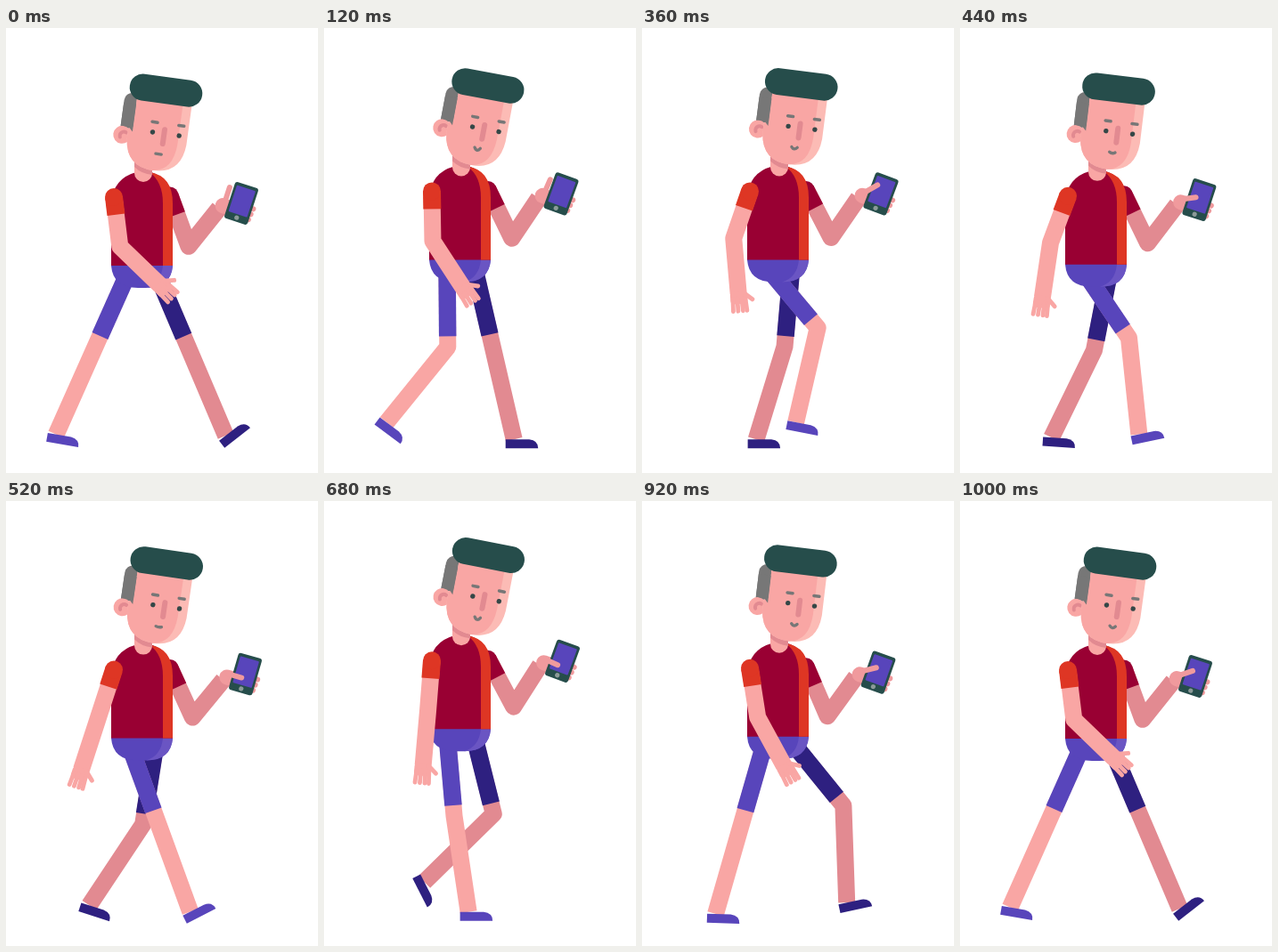
These frames come from a looping animation (350 by 500 pixels, 1.04 s). An HTML page with a canvas:

```html
<!DOCTYPE html>
<html lang="en">
<head>
<meta charset="utf-8">
<title>Walking with a phone</title>
<style>
html, body { margin: 0; width: 100%; height: 100%; overflow: hidden; background: #fff; }
canvas { display: block; }
</style>
</head>
<body>
<canvas id="stage" width="350" height="500"></canvas>
<script>
const ctx = document.getElementById('stage').getContext('2d');
const LOOP = 1040, STEP = 40;
const SKIN = '#f9a6a4', SHADE = '#e28a91', GLOW = '#fcbbb5', HAND = '#f09a9d';
const BLUE = '#5845bb', NAVY = '#2e2080', RED = '#990033', ORANGE = '#de3624';
const TEAL = '#264d4b', GREY = '#777777';

// Rows are [time, values...]; angles in degrees.
const nearLeg = [ // thigh, shin, foot
  [0, -24, -24, 10], [120, .5, -39, 37], [220, 22, -40, 45], [360, 40, -13, 11],
  [440, 34, 6, -12], [520, 20, 20, -27], [580, 14, 15, 0], [680, 5, 8.5, 0],
  [840, -8.5, -8.5, 0], [920, -16, -16, 2], [1000, -24, -24, 10]];
const farLeg = [
  [0, 23, 23, -38], [80, 16, 17, 0], [120, 13, 13, 0], [240, 3, 1, 0],
  [360, -5, -17, 0], [440, -11, -26, 4], [520, -9, -33.5, 18], [600, 0, -42, 42],
  [680, 14, -45.5, 63], [760, 34, -42, 52], [840, 48, -25.5, 26],
  [920, 39, 2, -12], [1000, 23, 23, -38]];
const nearArm = [ // upper, lower
  [0, 7, 46], [120, 1, 33], [360, -19, 5], [520, -18, -18],
  [680, -4.5, -5], [840, 9, 13], [1000, 7, 46]];
const farArm = [ // upper arm, phone x, phone y from waist, phone tilt
  [0, 20, 264, -70, 18], [120, 26, 266, -74, 20], [360, 27.4, 268, -74, 20.5],
  [520, 24.5, 268.5, -72, 16], [680, 28, 267.5, -76.5, 20],
  [840, 26, 266, -74, 20.5], [1000, 20, 264, -70, 18]];
const thumb = [ // tip x, tip y on the phone
  [0, -18, -13], [120, -17, -11], [360, -7, -8], [520, -3, 5],
  [680, -3.6, 6], [840, -3.3, -3], [1000, -4.7, -4.8]];
const smile = [[0, 0], [120, 2.6], [360, 2], [520, .6], [680, 2.6], [840, 2], [1000, 2]];

const rad = deg => deg * Math.PI / 180;
const wave = (t, peak) => Math.cos((t - peak) * Math.PI / 250);
const from = ([x, y], deg, len) => [x + len * Math.sin(rad(deg)), y + len * Math.cos(rad(deg))];

// Smooth curve through the rows
function at(rows, t) {
  let i = 0;
  while (i < rows.length - 2 && t >= rows[i + 1][0]) i++;
  const a = rows[i], b = rows[i + 1];
  const before = rows[i - 1] || a, after = rows[i + 2] || b;
  const span = b[0] - a[0], u = (t - a[0]) / span;
  return a.slice(1).map((v, k) => {
    const w = b[k + 1];
    const m = (w - before[k + 1]) / (b[0] - before[0]) * span;
    const n = (after[k + 1] - v) / (after[0] - a[0]) * span;
    return v + u * (m + u * (3 * (w - v) - 2 * m - n + u * (2 * (v - w) + m + n)));
  });
}

function line(color, width, cap, ...pts) {
  ctx.strokeStyle = color;
  ctx.lineWidth = width;
  ctx.lineCap = cap;
  ctx.lineJoin = 'round';
  ctx.beginPath();
  pts.forEach(p => ctx.lineTo(...p));
  ctx.stroke();
}

function shape(color, path) {
  ctx.fillStyle = color;
  ctx.fill(new Path2D(path));
}

function dot(color, x, y, r) {
  ctx.fillStyle = color;
  ctx.beginPath();
  ctx.arc(x, y, r, 0, 7);
  ctx.fill();
}

function box(color, x, y, w, h, r) {
  ctx.fillStyle = color;
  ctx.beginPath();
  ctx.roundRect(x, y, w, h, r);
  ctx.fill();
}

function local([x, y], deg, draw) {
  ctx.save();
  ctx.translate(x, y);
  ctx.rotate(rad(deg));
  draw();
  ctx.restore();
}

function leg(hip, [thigh, shin, foot], skin, cloth) {
  const knee = from(hip, thigh, 92), ankle = from(knee, shin, 109);
  line(skin, 19, 'butt', hip, knee, ankle);
  line(cloth, 19.5, 'butt', hip, from(hip, thigh, 80));
  dot(cloth, ...hip, 9.7);
  local(ankle, foot, () => shape(cloth, 'M-9.5 0H17Q27 1 27 10H-9.5Z'));
}

function drawFarArm(t, waist) {
  const [upper, x, y, tilt] = at(farArm, t);
  const shoulder = [184, waist - 79], phone = [x, waist + y];
  const elbow = from(shoulder, upper, 61);
  const c = Math.cos(rad(tilt)), s = Math.sin(rad(tilt));
  const wrist = [phone[0] - 22 * c - 13 * s, phone[1] - 22 * s + 13 * c];
  line(SHADE, 19, 'butt', shoulder, elbow, wrist);
  line(RED, 19, 'butt', shoulder, from(shoulder, upper, 23));
  dot(RED, ...shoulder, 9.5);
  local(phone, tilt, () => {
    line(HAND, 17, 'round', [-19, 9], [-10, 9]);
    for (const y of [2, 8.5, 15]) line(HAND, 6, 'round', [4, y], [15 - y / 8, y]);
    box(TEAL, -13.7, -21.5, 27.4, 43, 3);
    box(BLUE, -11, -18, 22, 31, 1);
    dot('#8b9a98', 0, 17, 2.6);
    line(HAND, 6, 'round', [-18, 5], at(thumb, t));
  });
}

function drawBody() {
  shape(BLUE, 'M118-1H187V0Q185 25 157 25H148Q120 25 118 0Z');
  shape('#6a55c3', 'M176-1H187V0Q185 25 157 25Q174 20 176 0Z');
  shape(RED, 'M118 0V-70Q120-98 146-105H163Q187-97 187-70V0Z');
  shape(ORANGE, 'M176 0V-70Q176-94 161-105Q187-101 187-70V0Z');
  shape(SKIN, 'M144-122H164V-104A10 10 0 0 1 144-104Z');
  shape(SHADE, 'M144-122H164V-102Q152-103 144-111Z');
}

function drawHead(t) {
  box(GREY, -45, 8, 18, 40, [9, 0, 0, 0]);
  dot(SKIN, -42, 56, 10);
  ctx.strokeStyle = SHADE;
  ctx.lineWidth = 4;
  ctx.lineCap = 'round';
  ctx.beginPath();
  ctx.arc(-40, 57, 4.5, 2.7, 5.2);
  ctx.stroke();
  shape(GLOW, 'M-31 5H31V58Q29 91-2 91Q-33 91-36 60V48L-31 46Z');
  shape(SKIN, 'M-31 5H21V58Q20 88-2 91Q-33 91-36 60V48L-31 46Z');
  shape(GREY, 'M-45 20H-31V51L-36 46H-45Z');
  box(TEAL, -41, -15, 82, 30, 15);
  line(SHADE, 6, 'round', [4.5, 44], [4.5, 60]);
  for (const x of [-8.5, 21.5]) {
    dot('#344747', x, 48.5, 2.7);
    line(GREY, 3.5, 'round', [x - 2, 37], [x + 4, 37]);
  }
  const [bend] = at(smile, t);
  ctx.strokeStyle = GREY;
  ctx.lineWidth = 3.3;
  ctx.beginPath();
  ctx.moveTo(-1.8, 72 - bend / 2);
  ctx.quadraticCurveTo(1.4, 72 + bend * 1.5, 4.6, 72 - bend / 2);
  ctx.stroke();
}

function drawNearArm(t, waist) {
  const [upper, lower] = at(nearArm, t);
  const shoulder = [121, waist - 77];
  const elbow = from(shoulder, upper, 56), wrist = from(elbow, lower, 62);
  line(SKIN, 19, 'butt', shoulder, elbow, wrist);
  line(ORANGE, 20, 'butt', shoulder, from(shoulder, upper, 20));
  dot(ORANGE, ...shoulder, 10);
  local(wrist, -lower, () => {
    box(SKIN, -9.5, -2, 19, 14, 4);
    for (const x of [-7.5, -2, 3.5, 8]) line(SKIN, 4.8, 'round', [x * .9, 6], [x, 20]);
    line(SKIN, 5, 'round', [6, 0], [15, 8]);
  });
}

function draw(t) {
  const waist = 260.8 + 6.2 * wave(t, -10);
  const nod = 1.4 + 2.1 * wave(t, 168);
  ctx.clearRect(0, 0, 350, 500);
  leg([168, waist + 6], at(farLeg, t), SHADE, NAVY);
  drawFarArm(t, waist);
  leg([138, waist + 6], at(nearLeg, t), SKIN, BLUE);
  local([0, waist], 0, drawBody);
  local([153, waist - 107], nod, () => local([26, -90], 7.5, () => drawHead(t)));
  drawNearArm(t, waist);
}

const start = performance.now();
function tick() {
  const t = (performance.now() - start) % LOOP;
  draw(Math.floor(t / STEP) * STEP);
  requestAnimationFrame(tick);
}
tick();
</script>
</body>
</html>
```
